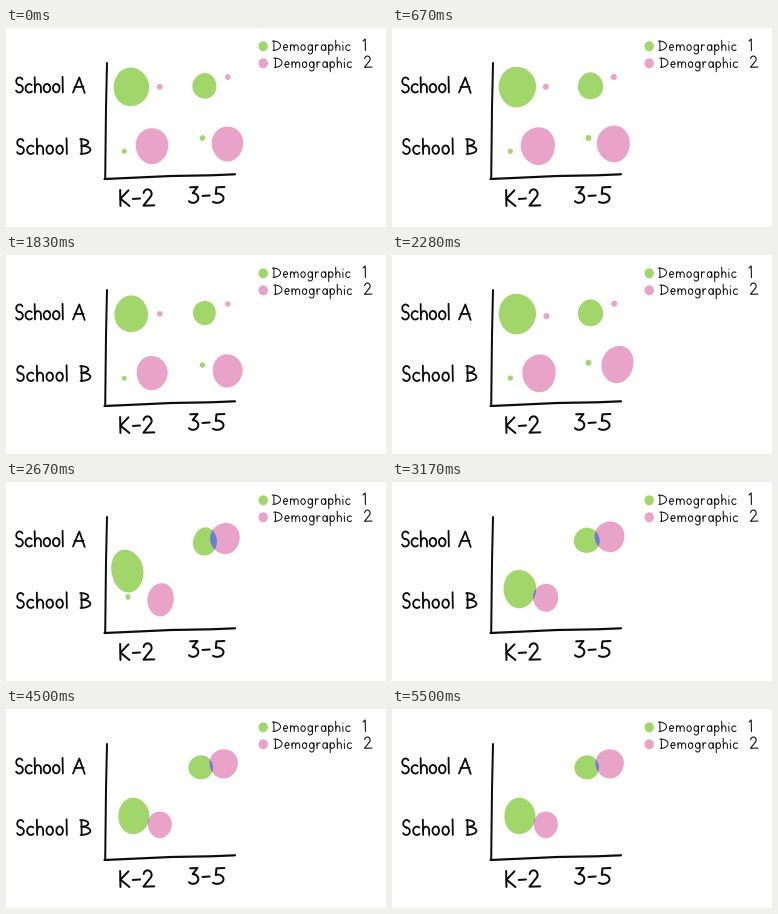
Recreate the animation shown at these times as a matplotlib script. Size 380 by 199 pixels, loop 5.66 s.

```python
import numpy as np
import matplotlib.pyplot as plt
from matplotlib.animation import FuncAnimation
from matplotlib.collections import LineCollection
from matplotlib.patches import Ellipse, Polygon

W, H, DPI = 380, 199, 100
LOOP, STEP = 5660, 20
GREEN, PINK, BLUE, INK = "#a1d76a", "#e9a3c9", "#6a80cc", "#0c0c0c"

fig = plt.figure(figsize=(W / DPI, H / DPI), dpi=DPI, facecolor="white")
ax = fig.add_axes([0, 0, 1, 1])
ax.set(xlim=(0, W), ylim=(H, 0))
ax.axis("off")


# --- pen strokes: baseline at 0, cap height 1 ------------------------------
def line(*pts):
    return np.array(pts, float)


def arc(cx, cy, rx, ry, a0, a1):
    a = np.radians(np.linspace(a0, a1, 28))
    return np.column_stack([cx + rx * np.cos(a), cy + ry * np.sin(a)])


def join(*parts):
    return np.concatenate(parts)


def stem(x, top, bottom=0):
    return line((x, top), (x + .02, bottom))


def hump(x, w):
    return join(arc(x + w / 2, .3, w / 2, .26, 180, 0), line((x + w, 0)))


ring = arc(.22, .29, .22, .28, 50, 410)
glyphs = {
    "S": [join(arc(.27, .75, .22, .25, 30, 270), arc(.25, .25, .24, .25, 90, -150))],
    "c": [arc(.25, .28, .25, .28, 50, 315)],
    "h": [stem(0, 1.03), hump(.02, .4)],
    "o": [ring],
    "l": [stem(.02, 1.05)],
    "A": [line((0, 0), (.42, 1), (.78, -.03)), line((.1, .36), (.7, .38))],
    "B": [stem(.06, 1), arc(.06, .77, .46, .22, 100, -90), arc(.06, .28, .6, .27, 90, -95)],
    "K": [stem(.04, 1), line((.56, .98), (.06, .46), (.62, 0))],
    "-": [line((0, .44), (.45, .47))],
    "2": [join(arc(.26, .76, .25, .28, 170, -30), line((0, .02), (.68, .04)))],
    "3": [join(line((.04, .98), (.5, 1), (.2, .62)), arc(.22, .31, .33, .3, 90, -140))],
    "5": [join(line((.66, 1), (.16, .98), (.12, .56)), arc(.2, .3, .4, .29, 100, -130))],
    "D": [stem(.08, .95), arc(.05, .48, .7, .46, 100, -95)],
    "e": [join(line((.04, .3)), arc(.24, .3, .21, .29, 5, 310))],
    "m": [stem(0, .58), hump(.02, .36), hump(.38, .4)],
    "g": [ring, join(line((.44, .56)), arc(.22, -.1, .23, .25, 0, -150))],
    "r": [stem(.02, .58), arc(.24, .3, .2, .26, 180, 60)],
    "a": [ring, stem(.44, .57)],
    "p": [stem(0, .58, -.42), ring],
    "i": [stem(.02, .55), stem(.03, .85, .82)],
    "1": [line((0, .86), (.2, 1.05), (.22, 0))],
}


def ink(strokes, width):
    ax.add_collection(LineCollection(strokes, colors=INK, linewidths=width * 72 / DPI,
                                     capstyle="round", joinstyle="round", zorder=5))


def letter(text, x, y, size, gap, width):
    strokes = []
    for ch in text:
        strokes += [(x, y) + s * (size, -size) for s in glyphs[ch]]
        x += size * max(s[:, 0].max() for s in glyphs[ch]) + gap
    ink(strokes, width)


ink([line((101, 35), (100, 80), (99.2, 151))], 2)
ink([line((98.5, 151), (130, 149.6), (165, 148), (205, 147.3), (229, 146.3))], 2.2)

letter("School", 9.5, 64.5, 15, 2.7, 1.8)
letter("A", 67, 64.5, 15, 0, 1.8)
letter("School", 10.5, 126, 15, 3.3, 1.8)
letter("B", 74.5, 126, 15, 0, 1.8)
letter("K-2", 113.5, 178, 16, 3.4, 2)
letter("3-5", 183.5, 175, 16, 4.2, 2)

for color, n, x, y in ((GREEN, "1", 267, 22.5), (PINK, "2", 268.5, 39.5)):
    letter("Demographic", x, y, 10, 2.7, 1)
    letter(n, x + 90, y, 11, 0, 1.1)
    ax.add_patch(Ellipse((257.2, y - 4.2), 9.4, 10, fc=color, lw=0))


# --- blobs -----------------------------------------------------------------
ANGLE = np.linspace(0, 2 * np.pi, 72, endpoint=False)
BOIL = .05


def smooth(u):
    u = np.clip(u, 0, 1)
    return u * u * (3 - 2 * u)


class Blob:
    """Eases from one (x, y, rx, ry) to another along a bowed path."""

    def __init__(self, color, start, end, bow, span):
        self.start, self.end = np.array(start), np.array(end)
        self.bow, self.span = bow, span
        self.phase = start[0]
        self.patch = Polygon(np.zeros((3, 2)), fc=color, lw=0, zorder=2)
        ax.add_patch(self.patch)

    def pose(self, tick):
        t0, t1 = self.span
        s = smooth((tick - t0) / (t1 - t0))
        mid = np.sin(np.pi * s)
        x, y, rx, ry = self.start + (self.end - self.start) * s
        x, y = x + self.bow[0] * mid, y + self.bow[1] * mid

        # stretched and leaning on the way, always boiling
        wob = (0, 1, -1)[tick // 3 % 3]
        rx *= (1 + BOIL * wob) * (1 - .07 * mid)
        ry *= (1 + BOIL * wob) * (1 + .1 * mid)
        lean = .02 * self.bow[0] * mid
        r = 1 + .014 * np.cos(3 * ANGLE + self.phase + wob)
        u, v = r * np.cos(ANGLE), r * np.sin(ANGLE)
        self.patch.set_xy(np.column_stack([x + rx * (u - lean * v), y + ry * v]))


class Lens:
    """Part of the pink blob lying over the green one."""

    def __init__(self, green, pink):
        self.pink = pink
        self.patch = Polygon(np.zeros((3, 2)), fc=BLUE, lw=0, zorder=3)
        ax.add_patch(self.patch)
        self.patch.set_clip_path(green.patch)

    def pose(self, tick):
        self.patch.set_xy(self.pink.patch.get_xy())


green_k = Blob(GREEN, (125.2, 59, 17.7, 19.3), (127.7, 107, 15.5, 18.2), (-6, 0), (41, 53))
green_3 = Blob(GREEN, (198.5, 58, 12, 12.8), (194.8, 58.4, 12.3, 12), (3, 1.5), (41, 53))
pink_k = Blob(PINK, (146, 118, 16.3, 18), (153.8, 115.7, 12, 13.3), (4, 1.6), (39, 53))
pink_3 = Blob(PINK, (221.5, 115.8, 15.7, 17.5), (217.7, 54.7, 14.2, 14.6), (14, 0), (39, 49))

# small dots end up hidden inside the big blob of their colour
dots = [
    Blob(PINK, (153.8, 58.8, 2.9, 2.9), (154, 115, 3, 3), (5, 0), (40, 48)),
    Blob(PINK, (221.8, 49, 2.9, 2.9), (219, 54, 3, 3), (4, -4), (40, 48)),
    Blob(GREEN, (118.3, 123.3, 2.5, 2.5), (125, 108, 2.5, 2.5), (0, 0), (40, 55)),
    Blob(GREEN, (196.5, 110, 2.8, 2.8), (196, 59, 2.8, 2.8), (0, 0), (40, 48)),
]
parts = [green_k, green_3, pink_k, pink_3, *dots,
         Lens(green_k, pink_k), Lens(green_3, pink_3)]


def held(ms):
    """18 ticks a second: drawn on ones during the move, on threes otherwise."""
    tick = int(ms * .018 + .1)
    if 39 <= tick < 54:
        return {42: 41, 53: 52}.get(tick, tick)
    return tick - tick % 3


def draw(i):
    tick = held((i + .5) * STEP)
    for p in parts:
        p.pose(tick)
    return []


anim = FuncAnimation(fig, draw, frames=LOOP // STEP, interval=STEP,
                     repeat=True, repeat_delay=0, blit=False)
plt.show()
```
